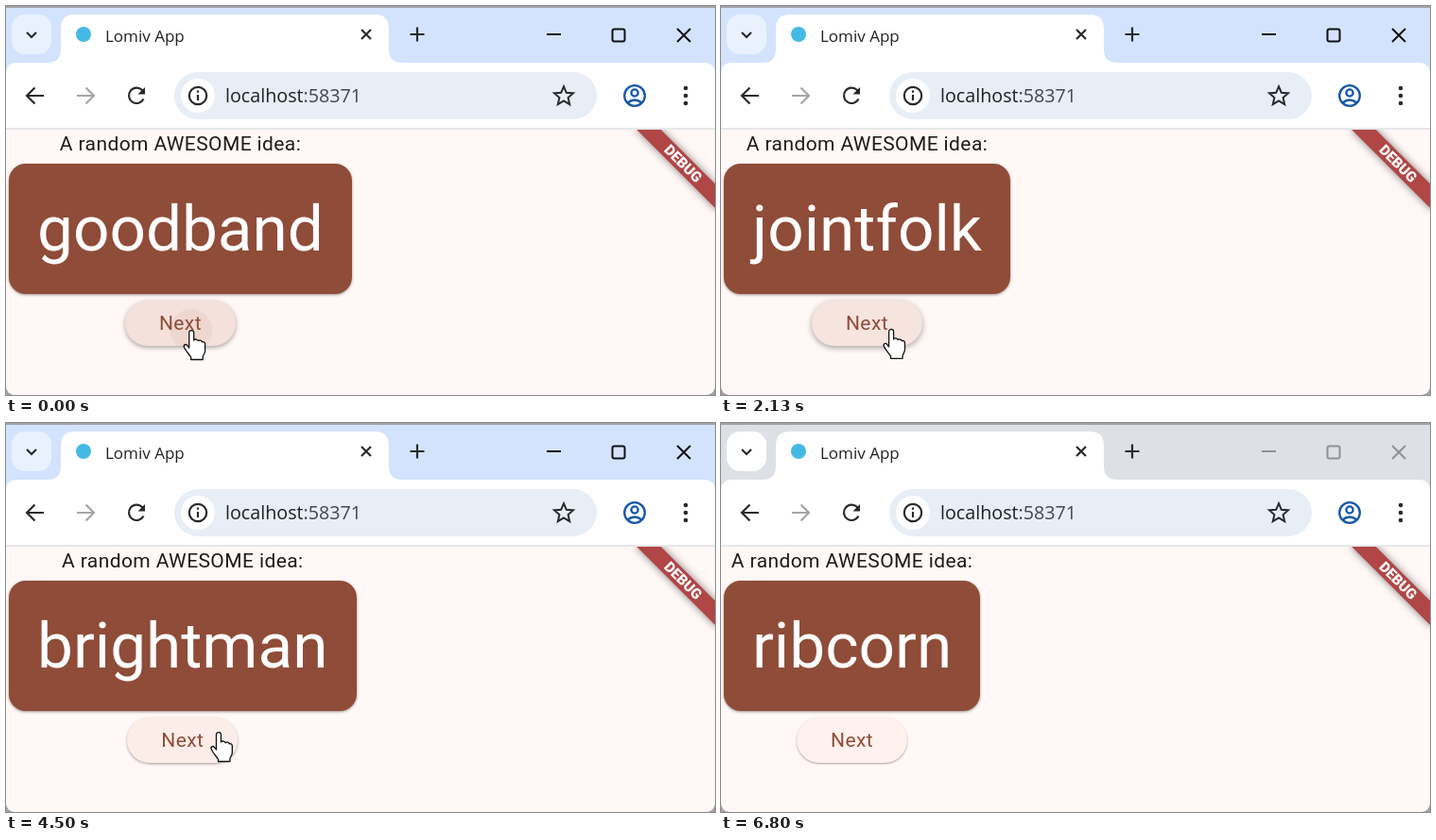
Write an HTML page that moves like this. It is 750x412 px and loops after 6.83 s.

```html
<!DOCTYPE html>
<html lang="en">
<head>
<meta charset="utf-8">
<title>Lomiv App</title>
<style>
  html, body { margin: 0; width: 100%; height: 100%; overflow: hidden; background: #a2a2a2; }
  #stage { position: absolute; left: 0; top: 0; width: 750px; height: 412px; overflow: hidden;
    border-radius: 0 0 9px 9px; background: #fff8f6; font-family: Roboto, sans-serif; }
  svg { position: absolute; left: 0; top: 0; overflow: visible; }
  .ui { font-family: "Open Sans", "Noto Sans", sans-serif; fill: #202124; }
  .line { fill: none; stroke: #28292c; stroke-width: 2.2; }

  #column { position: absolute; left: 3px; top: 131px; display: flex; flex-direction: column; align-items: center; }
  #label { height: 36px; font-size: 21px; line-height: 30px; letter-spacing: .4px; color: #231917; white-space: nowrap; }
  #card { padding: 30px; border-radius: 18px; background: #8f4c38; color: #fff; white-space: nowrap;
    font-size: 67.5px; line-height: 78px; box-shadow: 0 1px 3px rgba(0, 0, 0, .4); }
  #button { position: relative; margin-top: 6.5px; width: 117px; height: 48px; border-radius: 24px;
    overflow: hidden; text-align: center; font-size: 21px; line-height: 48px; letter-spacing: .4px; color: #8f4c38; }
  #button span { position: relative; }
  #ripple { position: absolute; border-radius: 50%; background: #8f4c38; }

  #view { position: absolute; left: 0; top: 131px; width: 750px; height: 281px; overflow: hidden; }
  #banner { position: absolute; left: 656px; top: 27px; width: 120px; height: 18px; transform: rotate(45deg);
    background: #b04646; box-shadow: 0 0 9px rgba(0, 0, 0, .5); color: #fff;
    font-size: 15.3px; font-weight: 900; line-height: 18px; text-align: center; }
</style>
</head>
<body>
<div id="stage">
  <svg width="750" height="131" viewBox="0 0 750 131">
    <rect id="titlebar" width="750" height="74"/>
    <path d="M0 1H750" stroke="#a0a4a8" stroke-width="2"/>
    <rect id="search" x="6" y="9" width="42" height="42" rx="14"/>
    <path class="line" d="M22 28l5 5 5-5"/>
    <path fill="#fff" d="M0 130V72Q0 60 12 60H44Q58 60 58 46V24Q58 9 73 9H390Q405 9 405 24V46Q405 60 419 60H738Q750 60 750 72V130Z"/>
    <path d="M0 130H750" stroke="#dfe1e5" stroke-width="1.500"/>
    <circle cx="82" cy="30" r="8" fill="#45b9e6"/>
    <text class="ui" x="105" y="38" font-size="17">Lomiv App</text>
    <path class="line" d="M376 25l10 10m0-10l-10 10"/>
    <path class="line" d="M427.500 30h15M435 22.500v15"/>

    <g id="controls" fill="none" stroke-width="2">
      <path d="M572 30h15M710 24l14 14m0-14l-14 14"/>
      <rect x="641.500" y="24.500" width="13" height="13" rx="2"/>
    </g>

    <path class="line" d="M40 95H22m8.500-8.500L22 95l8.500 8.500"/>
    <path class="line" d="M75 95h18m-8.500-8.500L93 95l-8.500 8.500" style="stroke:#a4a5a8"/>
    <path class="line" d="M145.500 98.500a8.200 8.200 0 1 1-1.500-9.500l2 2.500"/>
    <path d="M147 86v7.500h-7.500z" fill="#28292c"/>
    <rect x="178" y="70" width="447" height="50" rx="25" fill="#e8eef6"/>
    <circle cx="203" cy="95" r="18" fill="#fff"/>
    <circle class="line" cx="203" cy="95" r="9.200"/>
    <path class="line" d="M203 94v6M203 89.500v2.300"/>
    <text class="ui" x="232" y="102" font-size="19.700">localhost<tspan fill="#44474b">:58371</tspan></text>
    <path class="line" style="stroke-width:2" d="M590 85.200l2.800 6.600 7.200.6-5.400 4.700 1.600 7-6.200-3.700-6.200 3.700 1.600-7-5.400-4.700 7.200-.6z"/>
    <g fill="none" stroke="#1558a8" stroke-width="2.300">
      <circle cx="665" cy="95" r="10.800"/>
      <circle cx="665" cy="92" r="3.600"/>
      <path d="M657.500 102.500q7.500-6 15 0"/>
    </g>
    <g fill="#28292c">
      <circle cx="719" cy="87" r="2.300"/><circle cx="719" cy="95" r="2.300"/><circle cx="719" cy="103" r="2.300"/>
    </g>
  </svg>

  <div id="column">
    <div id="label">A random AWESOME idea:</div>
    <div id="card"></div>
    <div id="button"><div id="ripple"></div><span>Next</span></div>
  </div>

  <div id="view"><div id="banner">DEBUG</div></div>

  <svg width="750" height="412" viewBox="0 0 750 412">
    <g id="pointer" fill="#fff" stroke="#111" stroke-width="1.300" stroke-linejoin="round">
      <path id="hand" d="M-3.300 2.100a2.500 2.500 0 0 1 5 0V10c1-1.600 4.100-1.200 4.600.7c1.200-1.200 3.700-.6 4.200 1.200c1.300-.8 3.100.2 3.100 2.200V21c0 3-2 4.500-2.400 6.500V30.500H-1.300V28c-2-3-5-6-7-10c-1.600-3 1.200-4.400 3-2.600l2 2.600z"/>
      <path id="arrow" d="M.5 .5V23L5.500 18.300 9.500 27 13.300 25.300 9.400 17H17z"/>
    </g>
  </svg>
</div>
<script>
  const LOOP = 6830, INACTIVE_AT = 6600;
  const BUTTON = { w: 117, h: 48, y: 335.5 };
  const words = ['goodband', 'jointfolk', 'straightshorts', 'brightman', 'ribcorn'];
  // [press, release]; each release brings the next word
  const clicks = [[-40, 100], [2710, 2855], [4020, 4130], [5250, 5440]];
  // [time, x, y] of the pointer tip
  const path = [[0, 197, 344], [1300, 197, 344], [2100, 182, 343], [2550, 156, 338], [2780, 156, 338],
    [2870, 170, 338], [3150, 215, 343], [3450, 256, 334], [3670, 258, 328], [4440, 258, 328],
    [4500, 226, 328], [4720, 188, 335], [5720, 188, 335], [6220, 200, -40]];

  const $ = id => document.getElementById(id);
  const [card, button, ripple, pointer, hand, arrow, titlebar, search, controls] =
    ['card', 'button', 'ripple', 'pointer', 'hand', 'arrow', 'titlebar', 'search', 'controls'].map($);

  const clamp = v => Math.min(1, Math.max(0, v));
  const mix = (a, b, k) => a + (b - a) * k;
  const ease = u => { const v = u ** .6; return v * v * (3 - 2 * v); };

  const slope = (n, i) => path[n + 1] && path[n - 1 + 1] && n >= 0
    ? (path[n + 1][i] - path[n][i]) / (path[n + 1][0] - path[n][0]) : 0;
  // Harmonic mean of neighbouring slopes: smooth passage without overshoot.
  function tangent(n, i) {
    const a = slope(n - 1, i), b = slope(n, i);
    return a * b > 0 ? 2 * a * b / (a + b) : 0;
  }
  function along(t, i) {
    t = Math.max(0, t);
    const n = path.findIndex(k => k[0] > t) - 1;
    if (n < 0) return path[path.length - 1][i];
    const d = path[n + 1][0] - path[n][0], u = (t - path[n][0]) / d, r = 1 - u;
    return mix(path[n][i], path[n + 1][i], u * u * (3 - 2 * u))
      + d * u * r * (r * tangent(n, i) - u * tangent(n + 1, i));
  }
  const tip = t => ({ x: along(t, 1), y: along(t, 2) });

  const centers = words.map(word => {
    card.textContent = word;
    return 3 + card.offsetWidth / 2;
  });
  const wordAt = t => clicks.filter(c => c[1] <= t).length;

  function isOver(t) {
    const { x, y } = tip(t);
    return Math.abs(x - centers[wordAt(t)]) < BUTTON.w / 2 && Math.abs(y - BUTTON.y) < BUTTON.h / 2;
  }
  // Fades over 50 ms, a frame behind the pointer.
  const hoverAt = t => [30, 40, 50, 60, 70].filter(lag => isOver(t - lag)).length / 5;

  function drawButton(t) {
    const [down, up] = clicks.filter(c => c[0] <= t).pop();
    const since = Math.max(0, t - up), held = Math.min(t, up) - down;
    const press = clamp((t - down) / 200) * (1 - clamp(since / 200));
    const hover = hoverAt(t);

    const grow = ease(clamp(held / 1000 + since / 225));
    const r = mix(19, 71, grow), from = tip(down);
    const x = mix(from.x - centers[wordAt(down)], 0, grow) + BUTTON.w / 2;
    const y = mix(from.y - BUTTON.y, 0, grow) + BUTTON.h / 2;
    Object.assign(ripple.style, {
      left: x - r + 'px', top: y - r + 'px', width: 2 * r + 'px', height: 2 * r + 'px',
      opacity: .12 * clamp((t - down) / 75) * (1 - clamp((since - 225) / 150))
    });

    const tint = 1 - (1 - .08 * hover) * (1 - .1 * press), ink = [143, 76, 56];
    button.style.background = `rgb(${[255, 241, 237].map((v, i) => Math.round(mix(v, ink[i], tint)))})`;
    const lift = hover * (1 - press);
    button.style.boxShadow = `0 ${1 + lift}px ${2 + 4 * lift}px rgba(0, 0, 0, .35)`;
  }

  function draw(now) {
    const t = Math.max(0, now - start) % LOOP;
    const word = words[wordAt(t)];
    if (card.textContent !== word) card.textContent = word;
    drawButton(t);

    const { x, y } = tip(t), over = isOver(t);
    pointer.setAttribute('transform', `translate(${x} ${y})`);
    hand.style.display = over ? '' : 'none';
    arrow.style.display = over ? 'none' : '';

    const active = t < INACTIVE_AT;
    titlebar.setAttribute('fill', active ? '#d3e3fd' : '#dde1e5');
    search.setAttribute('fill', active ? '#e9f1fe' : '#fff');
    controls.setAttribute('stroke', active ? '#111' : '#8f9194');
    requestAnimationFrame(draw);
  }
  const start = performance.now();
  draw(start);
</script>
</body>
</html>
```
